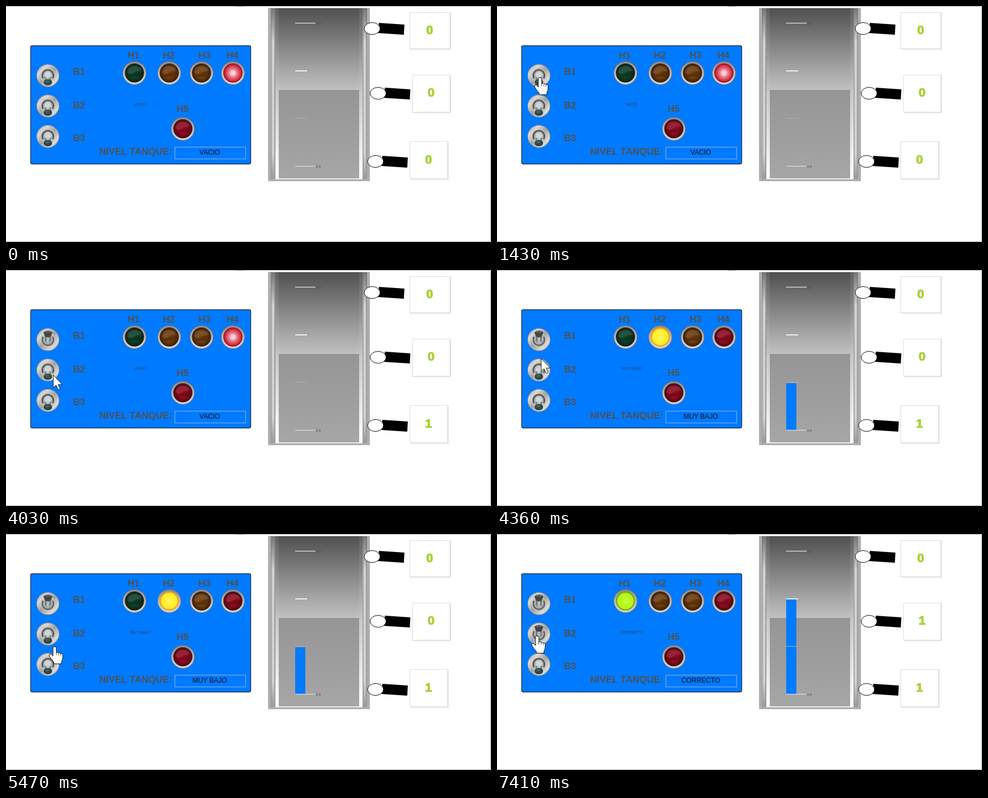
Write an HTML page that moves like this. It is 857 px wide and 419 px high and loops after 8000 ms.

```html
<!DOCTYPE html>
<html lang="es">
<head>
<meta charset="utf-8">
<title>Nivel de tanque</title>
<style>
html, body { margin: 0; width: 100%; height: 100%; overflow: hidden; background: #fff; }
svg { display: block; width: 100vw; height: 100vh; }
text { font-family: "Liberation Sans", Arial, sans-serif; }
.label { font-size: 16.8px; font-weight: bold; fill: #4c5157; }
.state { font-size: 12px; text-anchor: middle; fill: #0a0a14; }
.tiny { font-size: 7.2px; text-anchor: middle; fill: #2d4668; }
.scale { font-size: 6px; fill: #444; }
.digit { font-size: 22px; font-weight: bold; text-anchor: middle; fill: #a8dc1c; stroke: #93b83a; stroke-width: .7; }

/* Everything shares one 8 s clock */
.t { animation: 8s step-end infinite; }
.before1 { animation-name: before1; }
.after1 { animation-name: after1; }
.before2 { animation-name: before2; }
.after2 { animation-name: after2; }
.empty { animation-name: empty; }
.low { animation-name: low; }
.right { animation-name: right; }
.press { animation-name: press; }
.arrow { animation-name: arrow; }
.hand { animation-name: hand; }
.cursor { animation: move 8s linear infinite; }

@keyframes before1 { 0% { opacity: 1 } 46%, 100% { opacity: 0 } }
@keyframes after1 { 0% { opacity: 0 } 46%, 100% { opacity: 1 } }
@keyframes before2 { 0% { opacity: 1 } 89.375%, 100% { opacity: 0 } }
@keyframes after2 { 0% { opacity: 0 } 89.375%, 100% { opacity: 1 } }
@keyframes empty { 0% { opacity: 1 } 52.875%, 100% { opacity: 0 } }
@keyframes low { 0% { opacity: 0 } 52.875% { opacity: 1 } 92.625%, 100% { opacity: 0 } }
@keyframes right { 0% { opacity: 0 } 92.625%, 100% { opacity: 1 } }
@keyframes press { 0% { opacity: 0 } 36.875% { opacity: 1 } 37.625%, 100% { opacity: 0 } }
@keyframes arrow {
  0% { opacity: 0 } 7.375% { opacity: 1 } 17.5% { opacity: 0 }
  46.375% { opacity: 1 } 56.25%, 100% { opacity: 0 }
}
@keyframes hand {
  0% { opacity: 0 } 17.5% { opacity: 1 } 46.375% { opacity: 0 } 56.25%, 100% { opacity: 1 }
}
@keyframes move {
  0%, 7.375% { transform: translate(369px, 362px) }
  9%, 11.875% { transform: translate(269px, 255px) }
  15.625%, 46% { transform: translate(76px, 127px) }
  50.375%, 51.625% { transform: translate(83px, 186px) }
  55.875%, 58.125% { transform: translate(75px, 143px) }
  62.625%, 68.375% { transform: translate(86px, 200px) }
  71.75%, 100% { transform: translate(71px, 181px) }
}
</style>
</head>
<body>
<svg viewBox="0 0 857 419" preserveAspectRatio="none">
<defs>
  <linearGradient id="metal" x1="0" y1="0" x2="1" y2="1">
    <stop offset="0" stop-color="#8a8886"/><stop offset=".25" stop-color="#dcdad8"/>
    <stop offset=".5" stop-color="#a3a19f"/><stop offset=".78" stop-color="#dedcda"/>
    <stop offset="1" stop-color="#757371"/>
  </linearGradient>
  <linearGradient id="rim" x1="0" y1="0" x2="0" y2="1">
    <stop offset="0" stop-color="#8d8783"/><stop offset=".5" stop-color="#bdb8b5"/>
    <stop offset="1" stop-color="#dcd8d5"/>
  </linearGradient>
  <linearGradient id="lever" x1="0" y1="0" x2="1" y2="0">
    <stop offset="0" stop-color="#5f6464"/><stop offset=".5" stop-color="#c9cdcd"/>
    <stop offset="1" stop-color="#5f6464"/>
  </linearGradient>
  <radialGradient id="shade">
    <stop offset=".6" stop-color="#000" stop-opacity="0"/>
    <stop offset="1" stop-color="#000" stop-opacity=".45"/>
  </radialGradient>
  <radialGradient id="glow">
    <stop offset="0" stop-color="#fff" stop-opacity=".95"/>
    <stop offset=".45" stop-color="#fff" stop-opacity=".7"/>
    <stop offset=".6" stop-color="#fff" stop-opacity=".4"/>
    <stop offset="1" stop-color="#fff" stop-opacity=".15"/>
  </radialGradient>
  <linearGradient id="upper" x1="0" y1="0" x2="0" y2="1">
    <stop offset="0" stop-color="#505050"/><stop offset="1" stop-color="#c1c1c1"/>
  </linearGradient>
  <linearGradient id="lower" x1="0" y1="0" x2="0" y2="1">
    <stop offset="0" stop-color="#959595"/><stop offset="1" stop-color="#a6a6a6"/>
  </linearGradient>
  <linearGradient id="strip" x1="0" y1="0" x2="0" y2="1">
    <stop offset="0" stop-color="#606060"/><stop offset=".5" stop-color="#c8c8c8"/>
    <stop offset="1" stop-color="#fff"/>
  </linearGradient>
  <linearGradient id="rail" x1="0" y1="0" x2="1" y2="0">
    <stop offset="0" stop-color="#9a9a9a"/><stop offset=".5" stop-color="#dfe3e1"/>
    <stop offset="1" stop-color="#8a8c8b"/>
  </linearGradient>
  <linearGradient id="fade" x1="0" y1="0" x2="0" y2="1">
    <stop offset="0" stop-color="#777"/><stop offset=".2" stop-color="#777" stop-opacity="0"/>
    <stop offset=".85" stop-color="#999" stop-opacity="0"/><stop offset="1" stop-color="#999"/>
  </linearGradient>

  <g id="base">
    <circle r="20" fill="url(#metal)" stroke="#6a7686" stroke-width=".8"/>
    <circle r="13.5" fill="#c4c2c0" opacity=".7"/>
  </g>
  <g id="down">
    <use href="#base"/>
    <path d="M-8.5 5A10 10 0 1 1 8.5 5" fill="#a9adad" stroke="#4d5454" stroke-width="2.6"/>
    <circle cy="-1" r="6" fill="#d0d5d6"/>
    <path d="M-5 2Q0 6 5 2L6 11H-6Z" fill="url(#lever)"/>
    <ellipse cy="12" rx="7.5" ry="5.5" fill="#2c4846"/>
    <ellipse cx="-1" cy="10.5" rx="3.5" ry="1.8" fill="#4e6866"/>
  </g>
  <g id="up">
    <use href="#base"/>
    <path d="M-8.5 -5A10 10 0 1 0 8.5 -5" fill="#a9adad" stroke="#5a5f5f" stroke-width="2.4"/>
    <path d="M-5 -10H5L5 3Q0 9 -5 3Z" fill="url(#lever)"/>
    <path d="M-8 -13Q0 -19 8 -13L5 -5Q0 -3 -5 -5Z" fill="#434747"/>
    <path d="M-4 -13Q0 -15 4 -13" fill="none" stroke="#737979" stroke-width="1.5"/>
  </g>

  <g id="lamp">
    <circle r="20.5" fill="url(#rim)" stroke="#77716f" stroke-width=".8"/>
    <circle r="17" fill="#3a2a28"/>
    <circle r="15.8" fill="var(--c)"/>
    <circle r="15.8" fill="url(#shade)"/>
    <path d="M-13 -1Q-12 -12 0 -13Q12 -12 13 -4Q4 -5 -2 0Q-8 3 -13 -1Z" fill="#fff" opacity=".1"/>
    <path d="M-13 3Q-5 4 0 1Q6 -3 13 -1Q12 5 8 8Q0 3 -8 8Z" fill="#000" opacity=".18"/>
  </g>
  <g id="lit">
    <circle r="20.5" fill="url(#rim)" stroke="#77716f" stroke-width=".8"/>
    <circle r="17" fill="var(--e)"/>
    <circle r="14.5" fill="var(--c)"/>
    <circle r="11.5" fill="url(#glow)" opacity="var(--g)"/>
  </g>

  <g id="sensor">
    <path d="M12 -10L57 -7L56 11L10 8Z" fill="#000"/>
    <ellipse rx="14" ry="10.6" fill="#fff" stroke="#111"/>
  </g>
</defs>

<rect width="857" height="419" fill="#fff"/>
<path d="M0 .5H856.5V418.5H0" fill="none" stroke="#a9a9a9"/>
<path d="M407 .5H421M437 .5H438" stroke="#777"/>

<!-- control panel -->
<rect x="43.5" y="70.5" width="389" height="210" rx="3" fill="#007aff" stroke="#24364d" stroke-width="1.3"/>
<g class="label">
  <text x="215" y="93">H1</text><text x="277" y="93">H2</text>
  <text x="340" y="93">H3</text><text x="389.5" y="93">H4</text>
  <text x="301.5" y="187.7">H5</text>
  <text x="118.5" y="122">B1</text><text x="118.5" y="182">B2</text><text x="118.5" y="240">B3</text>
  <text x="164.5" y="263.7">NIVEL TANQUE:</text>
</g>
<rect x="298.5" y="250.5" width="125" height="21" fill="none" stroke="#86b4e4"/>

<g transform="translate(74 123.5)">
  <use href="#down" class="t before1"/>
  <use href="#up" class="t after1"/>
  <circle class="t press" r="20" fill="#ffe600" opacity="0" fill-opacity=".55"/>
</g>
<g transform="translate(74 177.5)">
  <use href="#down" class="t before2"/>
  <use href="#up" class="t after2"/>
</g>
<use href="#down" x="74" y="231.5"/>

<use href="#lamp" x="227" y="119" style="--c:#0f4029"/>
<use href="#lamp" x="288.5" y="119" style="--c:#6e3b0e"/>
<use href="#lamp" x="345.5" y="119" style="--c:#6e3b0e"/>
<use href="#lamp" x="401" y="119" style="--c:#8f0b20"/>
<use href="#lamp" x="312.5" y="218" style="--c:#8f0b20"/>

<!-- tank -->
<rect x="463" y="3.5" width="180" height="307.5" fill="#aeaeae"/>
<g id="rails">
  <rect x="468" y="4" width="8" height="303" fill="url(#rail)"/>
  <rect x="630" y="4" width="8" height="303" fill="url(#rail)"/>
  <rect x="468" y="4" width="8" height="303" fill="url(#fade)"/>
  <rect x="630" y="4" width="8" height="303" fill="url(#fade)"/>
</g>
<rect x="476" y="4" width="154" height="303.5" fill="url(#strip)"/>
<rect x="482" y="4" width="142" height="145.5" fill="url(#upper)"/>
<rect x="482" y="149" width="142" height="157" fill="url(#lower)"/>

<g class="t low"><rect x="511" y="201" width="18" height="84" fill="#007aff"/></g>
<g class="t right"><rect x="511" y="115" width="18" height="170" fill="#007aff"/></g>
<path d="M511 30.5H547M511 284.5H547" stroke="#d2d2d2" stroke-width="1.3"/>
<path d="M511 115.3H532" stroke="#fff" stroke-width="1.6"/>
<path d="M511 199.5H532" stroke="#aaa" stroke-width="1.3"/>
<text class="scale" x="548" y="32.5">3.0</text>
<text class="scale" x="548" y="286.5">0.0</text>

<!-- level sensors -->
<use href="#sensor" x="647" y="40"/>
<use href="#sensor" x="657.5" y="155"/>
<use href="#sensor" x="653" y="276"/>
<g fill="#fff" stroke="#dedede">
  <rect x="713.5" y="11.5" width="71" height="64.5"/>
  <rect x="718.5" y="122.5" width="66" height="66"/>
  <rect x="713.5" y="240.5" width="67" height="66.5"/>
</g>
<path d="M714 76.5H785V12M719 189H785V123M714 307.5H781V241" fill="none" stroke="#cfcfcf" stroke-width="1.2"/>
<g class="digit">
  <text x="748.7" y="50">0</text>
  <text class="t before2" x="751" y="161.3">0</text>
  <text class="t after2" x="751" y="161.3">1</text>
  <text class="t before1" x="746.5" y="279.5">0</text>
  <text class="t after1" x="746.5" y="279.5">1</text>
</g>

<!-- level states -->
<g class="t empty">
  <use href="#lit" x="401" y="119" style="--c:#d8364a;--e:#a8142a;--g:.9"/>
  <text class="tiny" x="238" y="177">VACIO</text>
  <text class="state" x="360" y="264">VACIO</text>
</g>
<g class="t low">
  <use href="#lit" x="288.5" y="119" style="--c:#fff02a;--e:#f3a51c;--g:.2"/>
  <text class="tiny" x="237.5" y="177">MUY BAJO</text>
  <text class="state" x="360" y="264">MUY BAJO</text>
</g>
<g class="t right">
  <use href="#lit" x="227" y="119" style="--c:#b4f812;--e:#76b414;--g:.2"/>
  <text class="tiny" x="238" y="177">CORRECTO</text>
  <text class="state" x="360" y="264">CORRECTO</text>
</g>

<g class="cursor" fill="#fff" stroke="#111" stroke-linejoin="round">
  <path class="t arrow" d="M.5 .5V23L5.5 18.6L9.3 26.6L12.8 25L9.2 17.2H16.3Z" stroke-width=".9"/>
  <g class="t hand">
    <path d="M-3 2Q-3 0 0 0Q3 0 3 2V10.5Q5.5 9 7 11.3Q9.5 10 10.6 12.5Q13.8 11.5 14.2 14.8V20Q14 24 12 26.5V30.5H-1.5V27.5Q-6 23 -9.3 17Q-10.5 14 -8 13.3Q-5.5 13.3 -3 17Z"/>
    <path d="M3 10V15M7 11.5V15.5M10.6 12.8V16" stroke-width=".8"/>
  </g>
</g>
</svg>
</body>
</html>
```
